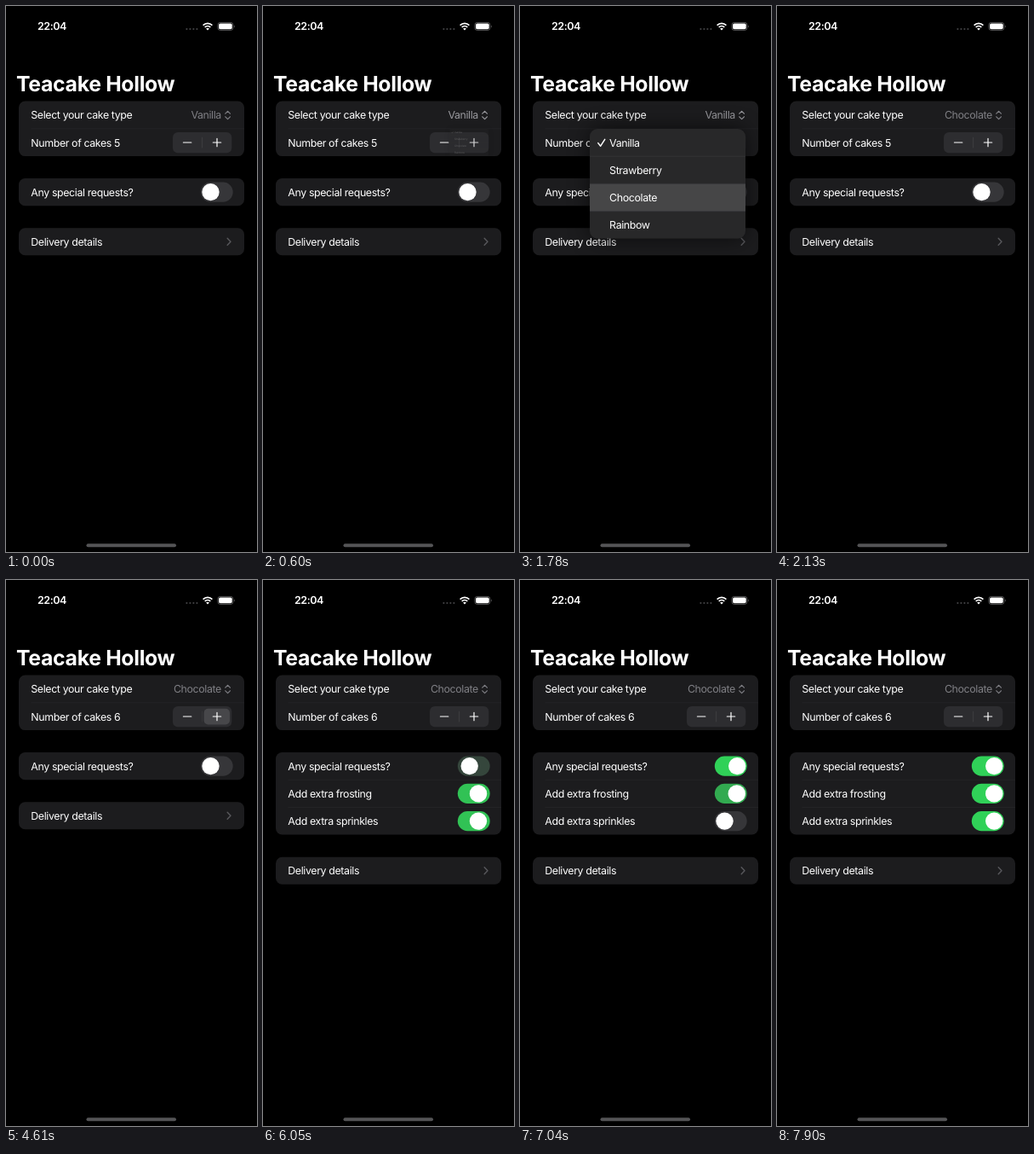
An HTML page that plays this animation: 295x640 px, repeating every 8000 ms.

```html
<!DOCTYPE html>
<html lang="en">
<head>
<meta charset="utf-8">
<title>Cake order form</title>
<style>
  html, body { margin: 0; width: 100%; height: 100%; overflow: hidden; background: #000; }
  svg { display: block; width: 100%; height: 100%; }
  text { font: 400 12.4px Inter, "Open Sans", sans-serif; letter-spacing: -.38px; fill: #fff; text-rendering: geometricPrecision; }
  .title { font-size: 24.8px; font-weight: 700; letter-spacing: -.32px; }
  .clock { font-size: 12.5px; font-weight: 600; letter-spacing: -.45px; }
  .cell { fill: #1c1c1e; }
  .rule { stroke: #29292b; stroke-width: .6; }
  .line { fill: none; stroke: #fff; stroke-linecap: round; stroke-linejoin: round; }
</style>
</head>
<body>
<svg viewBox="0 0 295 640">
  <defs>
    <filter id="soft" x="-40%" y="-40%" width="180%" height="180%">
      <feGaussianBlur stdDeviation="13"/>
    </filter>
    <clipPath id="menuClip"><rect x="82" y="144" width="183" height="128.7" rx="9"/></clipPath>
  </defs>
  <rect width="295" height="640"/>

  <!-- status bar -->
  <text class="clock" x="37" y="28.3">22:04</text>
  <g fill="#434346">
    <circle cx="212.4" cy="27" r="1.1"/><circle cx="216.4" cy="27" r="1.1"/>
    <circle cx="220.4" cy="27" r="1.1"/><circle cx="224.4" cy="27" r="1.1"/>
  </g>
  <g class="line" style="stroke-width:1.7;stroke-linecap:butt">
    <path d="M231.6 22.6a7.6 7.6 0 0 1 10.8 0M233.7 24.9a4.7 4.7 0 0 1 6.6 0"/>
  </g>
  <path d="M237 28.6l-1.9-2a2.7 2.7 0 0 1 3.8 0z" fill="#fff"/>
  <rect x="248.9" y="19.4" width="18" height="9" rx="2.8" fill="none" stroke="#6c6c6e" stroke-width=".8"/>
  <rect x="250.1" y="20.6" width="15.6" height="6.6" rx="1.7" fill="#fff"/>
  <path d="M268 22.4q1.6 1.5 0 3z" fill="#6c6c6e"/>

  <text class="title" x="12" y="100">Teacake Hollow</text>

  <!-- cake type and amount -->
  <rect class="cell" x="15" y="111.6" width="265" height="64.5" rx="7.5"/>
  <path class="rule" d="M29.5 143.8H280"/>
  <text x="29.3" y="132.4">Select your cake type</text>
  <g id="pick">
    <text id="type" x="252.9" y="132.4" text-anchor="end" style="fill:inherit"></text>
    <path d="M257.8 126.2l2.8-2.9 2.8 2.9M257.8 129.8l2.8 2.9 2.8-2.9" fill="none" stroke-width="1.2" stroke-linecap="round" stroke-linejoin="round"/>
  </g>
  <text id="count" x="29.3" y="164.5"></text>
  <rect x="196" y="148" width="69.3" height="24.2" rx="6" fill="#2d2d30"/>
  <path id="split" d="M230.6 153.8v12.6" stroke="#434346" stroke-width=".8"/>
  <rect id="press" x="232.6" y="150.8" width="30.4" height="18.6" rx="5" fill="#47474a"/>
  <path class="line" stroke-width="1.2" d="M208.4 160h9.4M243.3 160h9.4M248 155.3v9.4"/>

  <!-- requests -->
  <rect id="requests" class="cell" x="15" y="202" width="265" rx="7.5"/>
  <text x="29.3" y="222.7">Any special requests?</text>
  <g id="extras">
    <path class="rule" d="M29.5 234.3H280M29.5 266.5H280"/>
    <text x="29.3" y="255">Add extra frosting</text>
    <text x="29.3" y="287.2">Add extra sprinkles</text>
  </g>
  <g id="switches"></g>

  <!-- delivery -->
  <g id="delivery">
    <rect class="cell" x="15" y="260.3" width="265" height="32" rx="7.5"/>
    <text x="29.3" y="280.8">Delivery details</text>
    <path class="line" d="M260.2 272.3l3.8 4-3.8 4" style="stroke:#58585c;stroke-width:1.4"/>
  </g>

  <!-- popup menu -->
  <g id="menu">
    <rect x="82" y="144" width="183" height="128.7" rx="9" opacity=".6" filter="url(#soft)"/>
    <g clip-path="url(#menuClip)">
      <rect x="82" y="144" width="183" height="128.7" fill="#282829"/>
      <rect id="hover" x="82" y="208.4" width="183" height="32.3" fill="#464647"/>
      <path d="M82 176.2H265M82 208.4H265M82 240.6H265" stroke="#39393b" stroke-width=".7"/>
    </g>
    <path class="line" stroke-width="1.5" d="M91.8 160.6l2.9 3.6 5-7.8"/>
    <g id="items"></g>
  </g>

  <rect x="94.5" y="630.3" width="105.5" height="4" rx="2" fill="#545456"/>
</svg>
<script>
const LOOP = 8000;
const $ = id => document.getElementById(id);
const make = (tag, attrs, parent) => {
  const el = document.createElementNS('http://www.w3.org/2000/svg', tag);
  for (const k in attrs) el.setAttribute(k, attrs[k]);
  return parent.appendChild(el);
};

['Vanilla', 'Strawberry', 'Chocolate', 'Rainbow'].forEach((name, i) => {
  make('text', { x: 105.1, y: 164.6 + i * 32.2 }, $('items')).textContent = name;
});

// [time, scale, opacity]
const MENU = [
  [0, 0, 0], [500, .25, .2], [610, .68, .85], [720, .96, 1], [830, 1.009, 1],
  [940, 1.006, 1], [1060, 1.003, 1], [1170, 1, 1],
  [1900, .82, .75], [2010, .35, .2], [2130, 0, 0]
];
// [delay after the flip, knob travel, colour mix]
const FLIP = [[0, .15, .1], [110, .8, .48], [215, .97, .75], [320, 1, .9], [430, 1, 1]];

// Each switch: row centre and its flips as [time, new state]
const switches = [
  { y: 218.1, flips: [[6050, 1]] },
  { y: 250.4, flips: [[6050, 0], [6820, 1]] },
  { y: 282.6, flips: [[6050, 0], [7460, 1]] }
].map(s => {
  const g = make('g', {}, $('switches'));
  s.group = g;
  s.track = make('rect', { x: 228.8, y: s.y - 11.6, width: 37.9, height: 23.2, rx: 11.6 }, g);
  s.knob = make('circle', { cy: s.y, r: 10.2, fill: '#fff' }, g);
  return s;
});

const hold = (steps, t) => steps.filter(s => s[0] <= t).pop();
const mix = (a, b, k) => a.map((v, i) => Math.round(v + (b[i] - v) * k));
const OFF = [54, 54, 57], ON = [48, 209, 88];

function drawSwitch(s, t) {
  let pos = 0, tint = 0;
  const flip = hold(s.flips, t);
  if (flip) {
    [, pos, tint] = hold(FLIP, t - flip[0]);
    if (!flip[1]) { pos = 1 - pos; tint = 1 - tint; }
  }
  s.knob.setAttribute('cx', 240.5 + pos * 14.7);
  s.track.setAttribute('fill', `rgb(${mix(OFF, ON, tint)})`);
}

const show = (el, on) => el.setAttribute('visibility', on ? 'visible' : 'hidden');

function draw(t) {
  const [, scale, alpha] = hold(MENU, t);
  $('menu').setAttribute('transform', `translate(265 144) scale(${scale}) translate(-265 -144)`);
  $('menu').setAttribute('opacity', alpha);
  show($('menu'), alpha > 0);
  $('hover').setAttribute('opacity', t >= 1780 && t < 1900 ? 1 : 0);

  const grey = alpha ? '#98989d' : '#7f7f84';
  $('pick').setAttribute('fill', grey);
  $('pick').querySelector('path').setAttribute('stroke', grey);
  $('type').textContent = t < 1900 ? 'Vanilla' : 'Chocolate';

  const pressed = t >= 4610 && t < 4730;
  $('count').textContent = 'Number of cakes ' + (t < 4610 ? 5 : 6);
  show($('press'), pressed);
  $('split').setAttribute('opacity', pressed ? .5 : 1);

  const open = t >= 6050;
  $('requests').setAttribute('height', open ? 96.5 : 32.2);
  $('delivery').setAttribute('transform', `translate(0 ${open ? 64.4 : 0})`);
  show($('extras'), open);
  switches.forEach((s, i) => {
    show(s.group, open || i === 0);
    drawSwitch(s, t);
  });
}

const start = performance.now();
function tick() {
  draw((performance.now() - start) % LOOP);
  requestAnimationFrame(tick);
}
tick();
</script>
</body>
</html>
```
